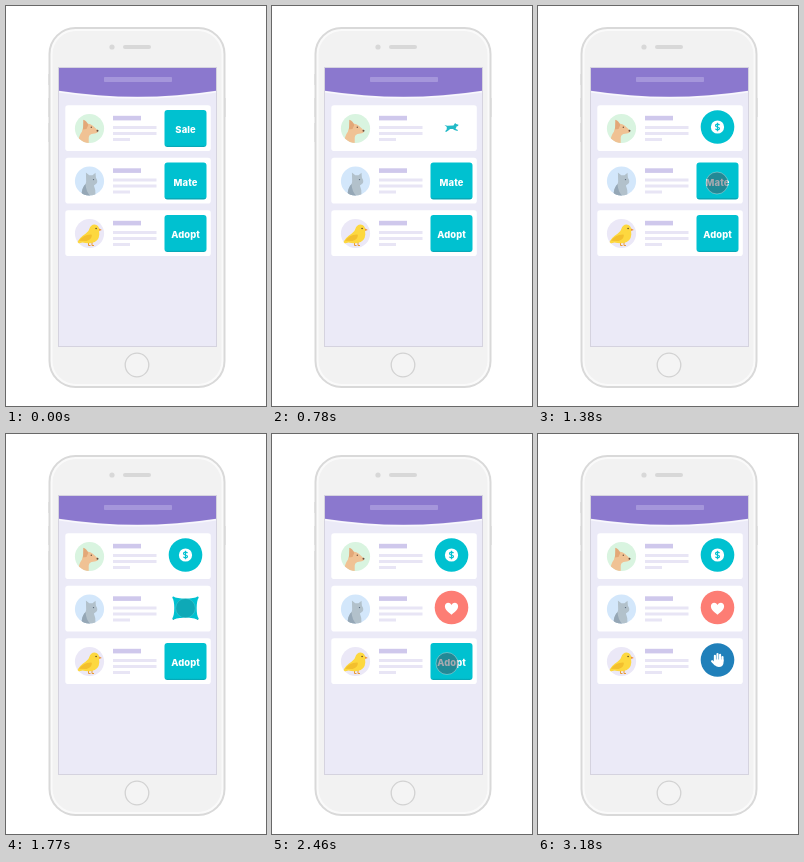
An HTML page that plays this animation: 260 px wide and 400 px high, repeating every 4.05 s.

```html
<!DOCTYPE html>
<html lang="en">
<head>
<meta charset="utf-8">
<title>Pet list</title>
<style>
  html, body { margin: 0; width: 100%; height: 100%; overflow: hidden; background: #fff; }
  svg { display: block; width: 100vw; height: 100vh; }
  .label { font: 800 9.4px Inter, "Open Sans", sans-serif; letter-spacing: .12px; fill: #fff; text-anchor: middle; }
</style>
</head>
<body>
<svg id="stage" viewBox="0 0 260 400">
  <defs>
    <linearGradient id="button" x2="0" y2="1">
      <stop offset=".955" stop-color="#00c1d0"/>
      <stop offset=".965" stop-color="#08a9b8"/>
    </linearGradient>
    <clipPath id="avatar"><circle r="14.6"/></clipPath>
  </defs>
  <path d="M42.6 68V79M42.6 92V111M42.6 117V136M219.4 92V111" stroke="#e4e4e4"/>
  <rect x="43.5" y="22" width="175" height="359" rx="26" fill="#fafafa" stroke="#d9d9d9" stroke-width="2"/>
  <rect x="46.5" y="25" width="169" height="353" rx="23.5" fill="#f2f2f2"/>
  <circle cx="106" cy="41" r="2.6" fill="#d8d8d8"/>
  <rect x="117" y="39" width="28" height="4" rx="2" fill="#d8d8d8"/>
  <circle cx="131" cy="359" r="11.8" fill="#f4f4f4" stroke="#d2d2d2" stroke-width="1.3"/>
  <rect x="52.5" y="61.5" width="158" height="279" fill="#ebeaf7" stroke="#d5d3df"/>
  <path d="M53 85.8Q131.5 97.8 210 85.8" fill="none" stroke="#f9f8fd" stroke-width="1.6"/>
  <path d="M53 62H210V84.8Q131.5 96.8 53 84.8Z" fill="#8b78ce"/>
  <rect x="98" y="71" width="68" height="5" rx=".8" fill="#a596db"/>
  <g id="list"></g>
</svg>
<script>
const LOOP = 4050, FIRST = 120, STEP = 1080, TOP = 99.3, PITCH = 52.5;

const dogHead = `
  <path d="M-12 15Q-10.5 7-7.5 3Q-7-2-3-4.5Q0-5.5 3-3L8.3 1.8Q9.3 4 6.5 4.8L2 5.4Q-1 6.5-.8 10V15Z" fill="#f0c294"/>
  <path d="M-6.5 1L-6.2-8.8Q-2.5-7.5-1.2-3.5L-3 .5Z" fill="#e3a878"/>
  <circle cx="1.8" cy="-1.2" r=".7" fill="#6b4d3c"/><circle cx="8" cy="2.2" r="1" fill="#6b4d3c"/>`;
const catHead = `
  <path d="M-8 15Q-8 7-4 3Q-3 1-3.4-2L-3.6-8.6-.2-5.8H3L6-8.2 6.4-3.2Q9 .2 6.8 2.8L4.4 4.4Q6.6 9 6 15Z" fill="#b2c1cb"/>
  <path d="M-8 15Q-8 7-4 3Q-3.6 10 .6 15Z" fill="#95a7b6"/>
  <circle cx="4" cy="-1.4" r=".7" fill="#566678"/>`;
const bird = `
  <path d="M-1 9V12M2.5 8.5V12M-1 12H1M2.5 12H4.5" stroke="#e99a35" fill="none"/>
  <path d="M9.2-5.2L12.4-3.4 9.2-2.4Z" fill="#ee8f36"/>
  <path d="M-13 10.5Q-10 3.5-4 .2Q-.5-2-.2-4.5Q1.2-9 5-9Q9.6-8.6 9.6-4Q9.6-1.6 9.8 1Q9.4 8.2 2 9.6Q-3 10.2-7 9Z" fill="#fdd83f"/>
  <path d="M-10.5 7.2Q-5 .4 2.4 1.2Q2.4 6-3 7.4Z" fill="#f3bf2e"/>
  <circle cx="6.6" cy="-5" r=".8" fill="#5d4524"/>`;

const coin = `<circle r="6.6" fill="#fff"/>
  <path d="M2-1.9Q1.4-2.9 0-2.9C-2.6-2.9-2.6-.2 0 0C2.7.2 2.6 2.9 0 2.9Q-1.5 2.9-2.1 1.8M0-4.2V4.2" fill="none" stroke="#00c1d0" stroke-width="1.2"/>`;
const heart = `<path d="M0 7.3C-4 4-6.6 1.8-6.6-1.2C-6.6-5.2-1.8-6-0-2.6C1.8-6 6.6-5.2 6.6-1.2C6.6 1.8 4 4 0 7.3Z" fill="#fff"/>`;
const hand = `<path d="M-2.6 1V-4.3M0 0V-5.9M2.6 0V-5.2M5 1V-3M-5.4 1.2L-2.2 4.4" stroke="#fff" stroke-width="2.1" stroke-linecap="round" fill="none"/>
  <path d="M-3.6-.5H6V3Q5.5 7 1.4 7Q-1.2 7-2.8 4.8L-3.8 3Z" fill="#fff"/>`;
const runner = `<path d="M-7-2.6L-4.2-1.7Q-1-2 2-2L3.6-4.4 4.6-3.6 7-2.8 6.5-1.5 5-1.1Q4.6.8 4 1.2L6.4 2.4 6 3.5 2.8 2.4 1.4 1.5-1.4 1.6-2.8 2.8-5.4 4.5-6.4 3.8-4.8 2-4.7-.4Z" fill="#22bac7"/>`;

const rows = [
  { label: "Sale", pet: dogHead, bg: "#d9f4e0", glyph: coin, color: "#00c1d0", tapX: 179, early: 0 },
  { label: "Mate", pet: catHead, bg: "#d3e7fb", glyph: heart, color: "#fd7d74", tapX: 179, early: 0 },
  { label: "Adopt", pet: bird, bg: "#ebe8f7", glyph: hand, color: "#2080ba", tapX: 175, early: 30 }
];

// Timings count from the moment a row is tapped.
const tapSize = [[0, 0], [150, 11], [480, 11], [570, 10], [599, 4]];
const tapShift = [[200, 0], [520, 1]];
const tapFill = [[480, .48], [570, .2]];
const boxSize = [[510, 1], [540, .82], [570, .64], [600, .33]];
const boxBend = [[510, 0], [570, 1], [600, 2]];
const runnerSize = [[600, .7], [630, .88], [660, 1], [690, 1], [735, .6]];
const badgeSize = [[690, .15], [750, .65], [840, 1.04], [930, 1]];
const glyphSize = [[720, 0], [780, .6], [870, 1.05], [930, 1]];

function at(keys, t) {
  if (t <= keys[0][0]) return keys[0][1];
  for (let i = 1; i < keys.length; i++) {
    const [t0, a] = keys[i - 1], [t1, b] = keys[i];
    if (t < t1) return a + (b - a) * (t - t0) / (t1 - t0);
  }
  return keys[keys.length - 1][1];
}

const bar = (y, w, h, fill) => `<rect x="107" y="${y}" width="${w}" height="${h}" fill="${fill}"/>`;

document.getElementById("list").innerHTML = rows.map((row, i) => `
  <g class="row" transform="translate(0 ${TOP + i * PITCH})">
    <rect x="59.3" width="145.5" height="45.8" rx="2.8" fill="#fff"/>
    <g transform="translate(83.5 23.2)">
      <circle r="14.6" fill="${row.bg}"/>
      <g clip-path="url(#avatar)">${row.pet}</g>
    </g>
    ${bar(10.5, 28, 4.6, "#cfc8ec")}${bar(20.7, 43.5, 3, "#e8e5f5")}
    ${bar(26.7, 43.5, 3, "#e8e5f5")}${bar(32.7, 17, 3, "#e8e5f5")}
    <path class="box" fill="url(#button)"/>
    <text class="label" x="179.6" y="27.9">${row.label}</text>
    <circle class="tap" fill="#474b57" stroke="#e8eef0" stroke-width=".8"/>
    <g class="runner">${runner}</g>
    <circle class="badge" cx="179.5" cy="21.7" fill="${row.color}"/>
    <g class="glyph">${row.glyph}</g>
  </g>`).join("");

const parts = [...document.querySelectorAll(".row")].map(g =>
  Object.fromEntries(["box", "label", "tap", "runner", "badge", "glyph"].map(n => [n, g.querySelector("." + n)])));

function show(el, on) {
  el.setAttribute("visibility", on ? "visible" : "hidden");
  return on;
}

function place(el, x, y, scale) {
  el.setAttribute("transform", `translate(${x} ${y}) scale(${scale})`);
}

// Rounded box whose sides pull inwards as it collapses, leaving small corner knobs.
function boxPath(scale, bend) {
  const w = 21 * scale, h = 18.6 * scale, r = 3 * scale * (1 - bend / 4);
  const x = w - r, y = h - r, p = bend * 2.6;
  const a = x - p, b = y - p, arc = `A${r} ${r} 0 0 1`;
  return `M${-x} ${-h}C${-a} ${-h + p} ${a} ${-h + p} ${x} ${-h}${arc} ${w} ${-y}` +
    `C${w - p} ${-b} ${w - p} ${b} ${w} ${y}${arc} ${x} ${h}` +
    `C${a} ${h - p} ${-a} ${h - p} ${-x} ${h}${arc} ${-w} ${y}` +
    `C${-w + p} ${b} ${-w + p} ${-b} ${-w} ${-y}${arc} ${-x} ${-h}Z`;
}

function drawRow(row, p, sinceTap) {
  const t = sinceTap + (sinceTap > 480 ? row.early : 0);

  if (show(p.box, t < 600)) {
    const bend = at(boxBend, t);
    p.box.setAttribute("d", boxPath(at(boxSize, t), bend));
    place(p.box, 179.5, 23.2 - bend * .8, 1);
  }
  show(p.label, t < 540);

  if (show(p.tap, t > 0 && t < 600)) {
    const k = at(tapShift, t), fill = at(tapFill, t);
    p.tap.setAttribute("cx", row.tapX + (179.5 - row.tapX) * k);
    p.tap.setAttribute("cy", 25.2 - 2.8 * k);
    p.tap.setAttribute("r", at(tapSize, t));
    p.tap.setAttribute("fill-opacity", fill);
    p.tap.setAttribute("stroke-opacity", fill);
  }

  if (show(p.runner, t >= 600 && t < 735)) place(p.runner, 179.5, 22.2, at(runnerSize, t));
  if (show(p.badge, t >= 690)) p.badge.setAttribute("r", 16.8 * at(badgeSize, t));
  if (show(p.glyph, t >= 720)) place(p.glyph, 179.5, 21.7, at(glyphSize, t));
}

const start = performance.now();
function frame() {
  const t = (performance.now() - start) % LOOP;
  rows.forEach((row, i) => drawRow(row, parts[i], t - FIRST - i * STEP));
  requestAnimationFrame(frame);
}
frame();
</script>
</body>
</html>
```
